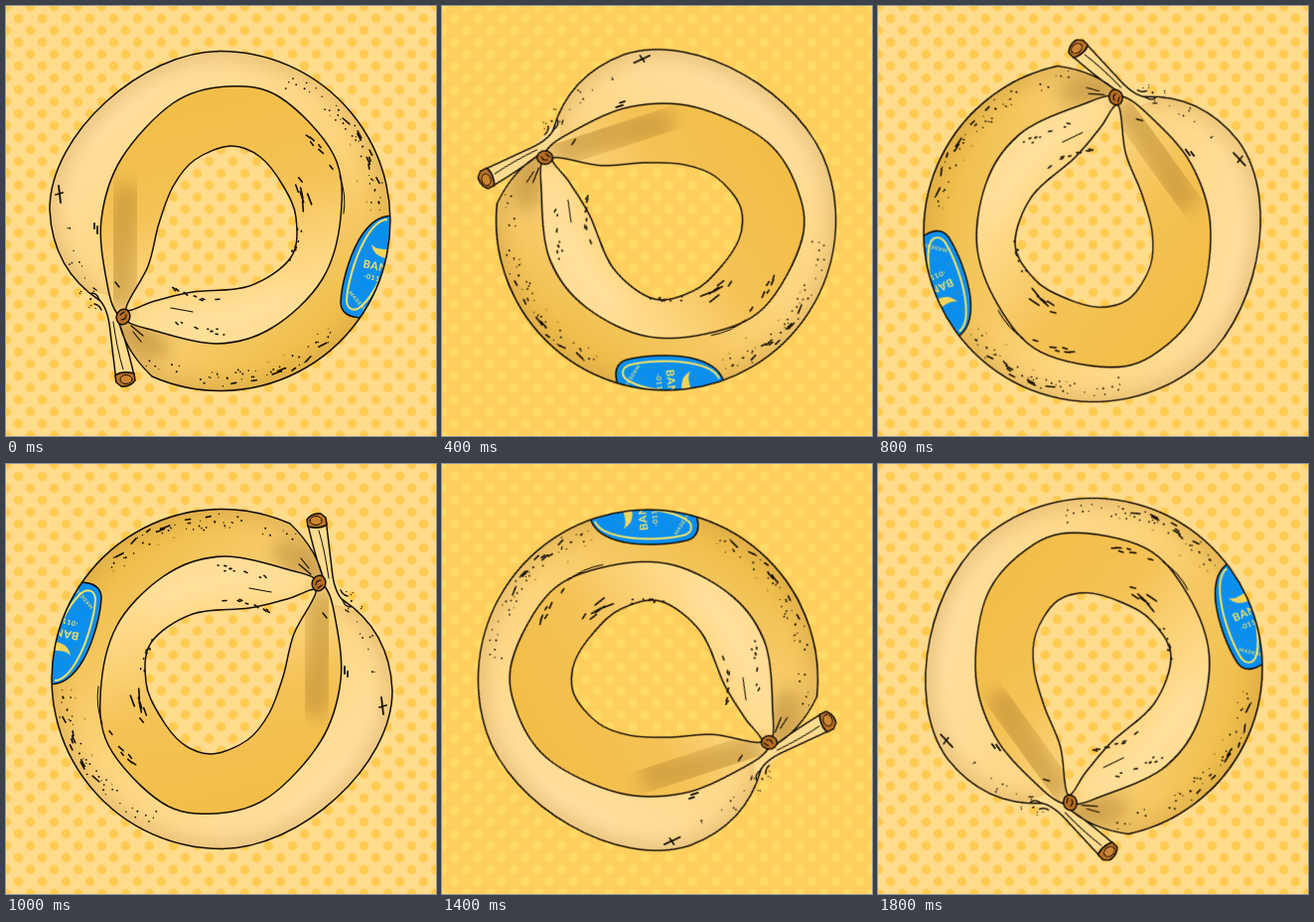
These frames come from a looping animation (433 px wide and 433 px high, 2 s). An HTML page:

```html
<!DOCTYPE html>
<html lang="en">
<head>
<meta charset="utf-8">
<title>Turning banana</title>
<style>
  html, body { margin: 0; width: 100%; height: 100%; overflow: hidden; background: #ffdb8c; }
  svg { display: block; width: 100vw; height: 100vh; }
  #banana { transform-origin: 216.5px 216.5px; }
  .ink { fill: none; stroke: #140d04; stroke-width: 1.5; stroke-linecap: round; stroke-linejoin: round; }
  .soft { filter: url(#soft); }
  text { font: 700 11px Lato, Inter, sans-serif; fill: #f4e36b; letter-spacing: .6px; }
  .small { font-size: 7px; }
  .tiny { font-size: 5px; }
</style>
</head>
<body>
<svg viewBox="0 0 433 433">
  <defs>
    <pattern id="dots" x="-11.5" y="-11.5" width="24" height="24" patternUnits="userSpaceOnUse">
      <g id="dotFill" fill="#ffca50">
        <circle cx="12" cy="12" r="4.7"/>
        <circle r="4.7"/><circle cx="24" r="4.7"/><circle cy="24" r="4.7"/><circle cx="24" cy="24" r="4.7"/>
      </g>
    </pattern>
    <filter id="soft" x="-60%" y="-60%" width="220%" height="220%"><feGaussianBlur stdDeviation="9"/></filter>
    <linearGradient id="skin" gradientUnits="userSpaceOnUse" x1="70" y1="140" x2="270" y2="370">
      <stop offset="0" stop-color="#ffdf9e"/>
      <stop offset=".55" stop-color="#fdd47c"/>
      <stop offset="1" stop-color="#efbe4c"/>
    </linearGradient>
    <linearGradient id="face" gradientUnits="userSpaceOnUse" x1="180" y1="90" x2="235" y2="320">
      <stop offset="0" stop-color="#f2be47"/>
      <stop offset=".45" stop-color="#f4c255"/>
      <stop offset=".85" stop-color="#ffd988"/>
      <stop offset="1" stop-color="#ffde96"/>
    </linearGradient>
    <path id="outer" d="M113 314C116 332 126 353 147 373A171 171 0 1 0 215 45.5C138 46 44 128 44 205C46 250 66 278 95 297Z"/>
    <path id="sticker" d="M396 212C377 208 365 219 355 236C345 254 338 280 337 298C337 309 346 314 360 314L396 290Z"/>
    <clipPath id="bodyClip"><path id="body" clip-rule="evenodd"/></clipPath>
    <clipPath id="faceClip"><path id="inner" clip-rule="evenodd"/></clipPath>
  </defs>

  <rect id="base" width="433" height="433" fill="#ffdb8c"/>
  <rect width="433" height="433" fill="url(#dots)"/>

  <g id="banana">
    <g clip-path="url(#bodyClip)">
      <rect width="433" height="433" fill="url(#skin)"/>
      <use href="#outer" class="soft" fill="none" stroke="#b98a3c" stroke-width="12" opacity=".45"/>
      <ellipse class="soft" cx="138" cy="335" rx="30" ry="15" transform="rotate(32 138 335)" fill="#a9782c" opacity=".5"/>
      <use href="#sticker" fill="#0b8fee"/>
      <path d="M384 215C376 215 368 223 360 238C351 255 344 280 343 296C343 304 348 307 354 305C366 298 379 274 386 252"
        fill="none" stroke="#efe069" stroke-width="2"/>
      <path d="M368 240Q374 248 394 243L392 254Q371 256 368 240Z" fill="#f3d55d"/>
      <text transform="translate(359 263) rotate(12)">BANANA</text>
      <text class="small" transform="translate(360 274) rotate(12)">·0113·</text>
      <text class="tiny" transform="translate(345 289) rotate(50)">MADE IN</text>
      <use href="#sticker" class="ink"/>
    </g>
    <g clip-path="url(#faceClip)">
      <rect width="433" height="433" fill="url(#face)"/>
      <path class="soft" d="M115 305Q112 240 125 180" fill="none" stroke="#b98a35" stroke-width="34" opacity=".55"/>
      <path class="soft" d="M140 312Q230 325 290 285" fill="none" stroke="#ffe5a8" stroke-width="18" opacity=".6"/>
    </g>
    <path d="M82 286Q98 305 104 325L111 378Q121 385 129 373Q126 350 118 330L104 292Z" fill="#fddc90"/>
    <g id="lines" class="ink"></g>
    <g id="marks" class="ink"></g>
    <g class="ink">
      <path d="M110 372Q117 367 129 370L130 377Q125 384 116 383L111 379Z" fill="#bd7427"/>
      <ellipse cx="121" cy="376" rx="6" ry="4.5" fill="#cf8632" stroke-width="1"/>
      <ellipse cx="118" cy="313" rx="6.8" ry="7.8" transform="rotate(18 118 313)" fill="#b96f22"/>
      <path d="M115 311l4-3m-3 8q5 0 5-5" stroke-width="1.2"/>
    </g>
  </g>
</svg>
<script>
const C = 216.5, R = 171;
const rad = deg => deg * Math.PI / 180;
const $ = id => document.getElementById(id);

function draw(parent, d, width, attrs = {}) {
  const el = document.createElementNS("http://www.w3.org/2000/svg", "path");
  Object.entries({ d, "stroke-width": width, ...attrs }).forEach(([k, v]) => el.setAttribute(k, v));
  $(parent).append(el);
}

// Smooth closed curve through a few key points.
function loop(text) {
  const pts = text.split(" ").map(p => p.split(",").map(Number));
  const at = i => pts[(i + pts.length) % pts.length];
  const ctrl = (p, a, b, s) => p.map((v, k) => (v + s * (b[k] - a[k]) / 6).toFixed(1));
  return "M" + pts[0] + pts.map((p, i) => {
    const q = at(i + 1);
    return "C" + [ctrl(p, at(i - 1), q, 1), ctrl(q, p, at(i + 2), -1), q].join(" ");
  }).join("") + "Z";
}

const outer = $("outer").getAttribute("d");
const ring = loop("114,312 101,275 96,215 116,154 168,98 222,81 276,92 330,150 337,213 318,276 268,324 213,340 150,327");
const hole = loop("121,305 143,262 154,219 168,182 190,155 226,141 256,152 279,181 292,213 287,253 245,282 188,288 150,297");
$("body").setAttribute("d", outer + hole);
$("inner").setAttribute("d", ring + hole);

for (const d of [ring, hole]) draw("lines", d, 1.5);
draw("lines", outer.slice(0, -1) + "Q103 306 105 328L111 378M112 315Q120 333 129 372", 1.5);
draw("lines", "M108 318Q112 346 118 366M336 171Q343 190 340 209", 1);

let seed = 11;
const rnd = () => (seed = seed * 16807 % 2147483647) / 2147483647;

// Strokes of a given length scattered along an arc; length 0 gives specks.
function scatter(radius, spread, from, to, count, length, style) {
  for (let i = 0; i < count; i++) {
    const a = rad(from + rnd() * (to - from));
    const r = radius + (rnd() + rnd() - 1) * spread;
    const turn = a + Math.PI / 2 + (rnd() - .5) * .5;
    const l = length * (.5 + rnd()) + .01;
    const x = C + r * Math.cos(a), y = C + r * Math.sin(a);
    draw("marks", `M${x.toFixed(1)} ${y.toFixed(1)}l${(l * Math.cos(turn)).toFixed(2)} ${(l * Math.sin(turn)).toFixed(2)}`,
      (length ? 1.6 : 1.1 + rnd()).toFixed(1), style);
  }
}
const faint = { stroke: "#a9781f", opacity: .55 };
scatter(158, 10, -64, -4, 38, 0);
scatter(158, 10, 40, 118, 44, 0);
scatter(152, 14, -45, 100, 16, 1, faint);
scatter(162, 5, -48, -12, 8, 6);
scatter(163, 4, 42, 90, 8, 6);
scatter(122, 4, -48, -22, 6, 5);
scatter(88, 5, -36, -6, 6, 9);
scatter(80, 5, 5, 32, 9, 1);
scatter(112, 6, 80, 115, 12, 1);
scatter(80, 5, 85, 125, 8, 3);
scatter(155, 10, 140, 180, 16, 0);

draw("marks", "M53 181L55 198M50 190l7-2M89 219v5m3-2v7", 1.8);
draw("marks", "M86 289q6 0 8 7m-5 4q5 1 7 6m-8-22l3 2m19-8l4 5", 1.4);
draw("marks", "M166 304l22 4M126 322l12 10m-10-4l8 10", 1.2);

// The drawing turns a tenth per step and is re-centred when the stem sticks out.
const STEPS = 10, tip = [-96.5, 159.5];
const recentre = v => -Math.sign(v) * Math.max(0, Math.abs(v) + 8 - R) / 2;
const poses = Array.from({ length: STEPS }, (_, i) => {
  const a = rad(i * 360 / STEPS), [x, y] = tip;
  const dx = recentre(x * Math.cos(a) - y * Math.sin(a));
  const dy = recentre(x * Math.sin(a) + y * Math.cos(a));
  return `translate(${dx.toFixed(2)}px, ${dy.toFixed(2)}px) rotate(${i * 360 / STEPS}deg)`;
});

function hold(id, prop, values) {
  const frames = [...values, values[values.length - 1]].map((v, i) =>
    ({ [prop]: v, offset: i / values.length, easing: "steps(1, end)" }));
  $(id).animate(frames, { duration: 2000, iterations: Infinity });
}
// Two pale steps, then two deep ones.
const swap = (pale, deep) => poses.map((_, i) => i % 4 < 2 ? pale : deep);
hold("banana", "transform", poses);
hold("base", "fill", swap("#ffdb8c", "#ffcf5d"));
hold("dotFill", "fill", swap("#ffca50", "#ffda66"));
</script>
</body>
</html>
```
